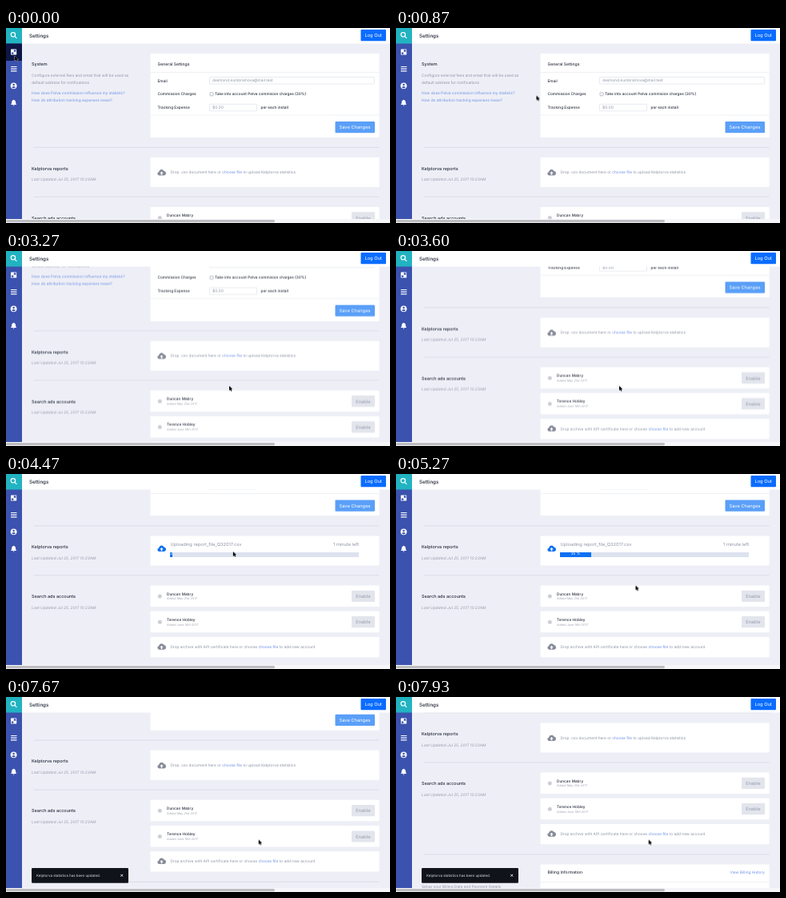
Recreate the animation shown at these times as an HTML page. Size 480 px wide and 244 px high, loop 8 s.

```html
<!DOCTYPE html>
<html lang="en">
<head>
<meta charset="utf-8">
<title>Settings</title>
<style>
@property --pct { syntax: '<integer>'; inherits: false; initial-value: 0; }
html, body { margin: 0; width: 100%; height: 100%; overflow: hidden; background: #eeeff6; }
svg { position: absolute; left: 0; top: 0; display: block; }
text, .fill { font-family: Inter, Roboto, 'Liberation Sans', sans-serif; text-rendering: geometricPrecision; }
text { font-size: 4.8px; fill: #8d93a5; white-space: pre; }
.h { font-size: 5.5px; font-weight: 500; fill: #252b3c; }
.label { font-size: 4.73px; font-weight: 500; fill: #2b3040; }
.link { fill: #6d90e4; }
.when { font-style: italic; fill: #969bab; }
.tiny { font-size: 3.75px; font-style: italic; fill: #a0a4b2; }
.btn { font-size: 5.75px; text-anchor: middle; fill: #fff; }
.off { fill: #969cac; }
.card { fill: #fff; }
.rule { stroke: #d3d8e6; stroke-width: .8; }
.thin { stroke: #e9ebf1; stroke-width: .7; }
.field { fill: #fff; stroke: #d9dce5; stroke-width: .6; }

.page, .cursor, .active, .on, .drop, .upload, .toast, .bar, .fill, .fill::after {
  animation: 8s linear infinite;
}
.page { animation-name: scroll; }
@keyframes scroll {
  0%, 37.5% { transform: translateY(0); animation-timing-function: cubic-bezier(.22, .2, .2, 1); }
  49.25%, 94.25% { transform: translateY(-84.5px); animation-timing-function: ease-in-out; }
  99.1%, 100% { transform: translateY(-129.5px); }
}
.cursor { animation-name: move; }
@keyframes move {
  0%, .7% { transform: translate(11px, 35px); animation-timing-function: ease-in-out; }
  10.8%, 11.8% { transform: translate(175.5px, 84.5px); animation-timing-function: ease-in-out; }
  21.6%, 32.6% { transform: translate(254.5px, 81.5px); }
  33.35% { transform: translate(265.5px, 119.5px); animation-timing-function: ease-out; }
  35.87%, 48.8% { transform: translate(279px, 168.7px); animation-timing-function: ease-in-out; }
  52.5%, 54.8% { transform: translate(283px, 95px); animation-timing-function: ease-in-out; }
  62%, 87.6% { transform: translate(299.5px, 139.5px); animation-timing-function: ease-out; }
  90%, 100% { transform: translate(315.7px, 178.5px); }
}
.active { animation-name: leave; }
@keyframes leave { 0%, 2.5% { opacity: 1; } 4.2%, 100% { opacity: 0; } }
.on { animation-name: check; }
@keyframes check {
  0%, 23.36% { opacity: 0; }
  23.37%, 29.1% { opacity: 1; }
  30%, 100% { opacity: 0; }
}
.drop { animation-name: idle; }
@keyframes idle {
  0%, 54.99% { opacity: 1; }
  55%, 79.99% { opacity: 0; }
  80%, 100% { opacity: 1; }
}
.upload, .bar { animation-name: busy; }
@keyframes busy {
  0%, 54.99% { opacity: 0; }
  55%, 79.99% { opacity: 1; }
  80%, 100% { opacity: 0; }
}
.toast { animation-name: pop; }
@keyframes pop {
  0%, 79.9% { opacity: 0; transform: translateY(8px); animation-timing-function: ease-out; }
  81.5%, 100% { opacity: 1; transform: none; }
}
.bar {
  position: absolute; left: 205px; top: 98.2px; width: 236px; height: 5.8px;
  background: #dce2ee; overflow: hidden;
}
.fill {
  height: 100%; overflow: hidden; background: #0f70f2; color: #fff;
  font-size: 4.6px; line-height: 5.8px; text-align: center; white-space: nowrap;
  animation-name: grow;
}
@keyframes grow {
  0%, 55% { width: 0; }
  65.9% { width: 39px; }
  75.9% { width: 123px; }
  78.9%, 100% { width: 236px; }
}
.fill::after {
  counter-reset: pct var(--pct); content: counter(pct) ' %';
  animation-name: count;
}
@keyframes count {
  0%, 55% { --pct: 0; }
  65%, 66.6% { --pct: 35; }
  75.9% { --pct: 62; }
  78.9%, 100% { --pct: 100; }
}
</style>
</head>
<body>
<svg width="480" height="244" viewBox="0 0 480 244">
  <defs>
    <g id="cloud">
      <path d="M-3 3.6a2.4 2.4 0 0 1-.4-4.7a3.4 3.4 0 0 1 6.4-1a2.9 2.9 0 0 1 .3 5.7z"/>
      <path d="M0-1.5l2.1 2.2h-1.3v2h-1.6v-2h-1.3z" fill="#fff"/>
    </g>
    <g id="account">
      <rect class="card" x="180.500" width="286" height="26.500" rx="1"/>
      <circle cx="192.300" cy="13.500" r="2.500" fill="#cdcfd8"/>
      <rect x="432" y="6.300" width="29" height="14.200" rx="1" fill="#e3e5ed"/>
      <text class="btn off" x="446.400" y="15.500">Enable</text>
    </g>
  </defs>

  <rect width="480" height="244" fill="#eeeff6"/>

  <g class="page">
    <text class="h" x="32" y="47">System</text>
    <text x="32" y="60.700">Configure external fees and email that will be used as</text>
    <text x="32" y="69.700">default address for notifications</text>
    <text class="link" x="32" y="82.900">How does Pelva commission influence my statistic?</text>
    <text class="link" x="32" y="91.900">How do attribution tracking expenses mean?</text>

    <rect class="card" x="180.500" y="32" width="286" height="105" rx="1"/>
    <text class="label" x="189.500" y="46.700" style="font-size:5.060px">General Settings</text>
    <path class="thin" d="M180.500 55.500H466.500M180.500 109H466.500"/>
    <text class="label" x="189.500" y="68.300">Email</text>
    <rect class="field" x="254.500" y="61.500" width="206" height="8.500" rx=".6"/>
    <text x="258" y="67.400">desmond.kumbramova@mail.test</text>
    <text class="label" x="189.500" y="84.300">Commission Charges</text>
    <rect x="255" y="80.800" width="4" height="4" rx=".7" fill="#fff" stroke="#8f95a5" stroke-width=".6"/>
    <g class="on">
      <rect x="254.700" y="80.500" width="4.600" height="4.600" rx=".8" fill="#0f70f2"/>
      <path d="M255.800 82.900l.9 1 1.500-2.100" fill="none" stroke="#fff" stroke-width=".7"/>
    </g>
    <text class="label" x="261" y="84.300">Take into account Pelva commision charges (30%)</text>
    <text class="label" x="189.500" y="100.700">Tracking Expense</text>
    <rect class="field" x="254.500" y="95.300" width="59" height="8.500" rx=".6"/>
    <text x="258" y="101.300" style="font-size:5px">$0.00</text>
    <text class="label" x="318.500" y="101.200">per each install</text>
    <rect x="411.500" y="117" width="49.500" height="14.200" rx="1" fill="#5a9ff8"/>
    <rect class="on" x="411.500" y="117" width="49.500" height="14.200" rx="1" fill="#0f70f2"/>
    <text class="btn" x="436" y="126.200">Save Changes</text>

    <path class="rule" d="M35 149.300H466.500M35 211.300H466.500M35 326.500H466.500"/>

    <text class="h" x="32" y="177.500">Kelptorva reports</text>
    <text class="when" x="32" y="191.200">Last Updated Jul 25, 2017 10:23AM</text>
    <rect class="card" x="180.500" y="162" width="286" height="37" rx="1"/>
    <g class="drop">
      <use href="#cloud" x="194.500" y="181" fill="#878b98"/>
      <text x="205.500" y="182.400">Drop .csv document here or <tspan class="link">choose file</tspan> to upload Kelptorva statistics</text>
    </g>
    <g class="upload">
      <use href="#cloud" x="194.500" y="178" fill="#0f70f2"/>
      <text x="205.500" y="174.500" style="font-size:5.670px">Uploading report_file_Q32017.csv</text>
      <text x="441" y="174.500" text-anchor="end" style="font-size:5.670px">1 minute left</text>
    </g>

    <text class="h" x="32" y="239.500">Search ads accounts</text>
    <text class="when" x="32" y="253.200">Last Updated Jul 25, 2017 10:23AM</text>
    <use href="#account" y="224"/>
    <text class="label" x="201" y="236">Duncan Mabry</text>
    <text class="tiny" x="201" y="241.800">Added May 21st 2017</text>
    <use href="#account" y="256.300"/>
    <text class="label" x="201" y="268.300">Terence Hobley</text>
    <text class="tiny" x="201" y="274.100">Added June 16th 2017</text>
    <rect class="card" x="180.500" y="288.500" width="286" height="25.300" rx="1"/>
    <use href="#cloud" x="194.500" y="300.700" fill="#878b98"/>
    <text x="205.500" y="302.700">Drop archive with API certificate here or choose <tspan class="link">choose file</tspan> to add new account</text>

    <text class="h" x="32" y="351">Billing</text>
    <text x="32" y="368.300">Setup your Billing Data and Payment Details</text>
    <rect class="card" x="180.500" y="339" width="286" height="80" rx="1"/>
    <text class="label" x="189.500" y="350.700" style="font-size:5.060px">Billing Information</text>
    <text class="link" x="461" y="350.500" text-anchor="end">View Billing History</text>
    <path class="thin" d="M180.500 361H466.500"/>
  </g>

  <rect width="480" height="19.500" fill="#fff"/>
  <text x="29" y="11.500" style="font-size:6.200px;font-weight:500;fill:#1f2433">Settings</text>
  <rect x="443.500" y="2" width="31.500" height="14.200" rx="1" fill="#0a6cff"/>
  <text class="btn" x="459.200" y="11.200">Log Out</text>

  <rect width="20" height="244" fill="#3b52ae"/>
  <rect width="20" height="19.500" fill="#22b3c1"/>
  <rect class="active" y="19.500" width="20" height="21.500" fill="#0e1646"/>
  <g fill="none" stroke="#fff" stroke-width="1.200">
    <circle cx="8.900" cy="8.300" r="2.700"/>
    <path d="M10.900 10.300l2.500 2.500"/>
    <path d="M6 48.500h7.500M6 51.200h7.500M6 53.900h7.500"/>
  </g>
  <g fill="#fff">
    <rect x="6" y="26.500" width="7.200" height="7" rx=".5"/>
    <path d="M9.800 27.300h2.600v2.500h-2.600zM6.800 30.400h2.600v2.400h-2.600z" fill="#3b52ae"/>
    <circle cx="9.600" cy="72.300" r="3.900"/>
    <path d="M6.600 92.500M6 96q1.100-.8 1.100-3 0-2.500 2-2.900 .5-.9 1 0 2 .4 2 2.900 0 2.200 1.100 3zM8.700 96.500h1.800q-.1 1-.9 1t-.9-1z"/>
  </g>
  <g fill="#3b52ae">
    <circle cx="9.600" cy="71" r="1.300"/>
    <path d="M7.200 74.600q.3-1.700 2.400-1.700t2.400 1.700q-2.400 1.600-4.800 0z"/>
  </g>

  <g class="toast">
    <rect x="32" y="214" width="121" height="18.800" rx="1.200" fill="#10141a"/>
    <text x="38" y="225" style="font-size:4.450px;fill:#dfe2e6">Kelptorva statistics has been updated.</text>
    <path d="M143.300 221.900l2.800 2.800m0-2.800l-2.800 2.800" stroke="#fff" stroke-width=".9"/>
  </g>

  <rect y="239" width="480" height="5" fill="#f6f6f8"/>
  <rect y="240" width="336" height="3.200" rx="1.600" fill="#bdbdc1"/>
</svg>

<div class="bar"><div class="fill"></div></div>

<svg class="cursor" width="8" height="10" viewBox="0 0 8 10" overflow="visible">
  <path d="M0 0v5.900l1.400-1.200 .9 2 1.100-.5-.9-1.900h1.800z" fill="#000" stroke="#fff" stroke-width=".6" paint-order="stroke"/>
</svg>
</body>
</html>
```
